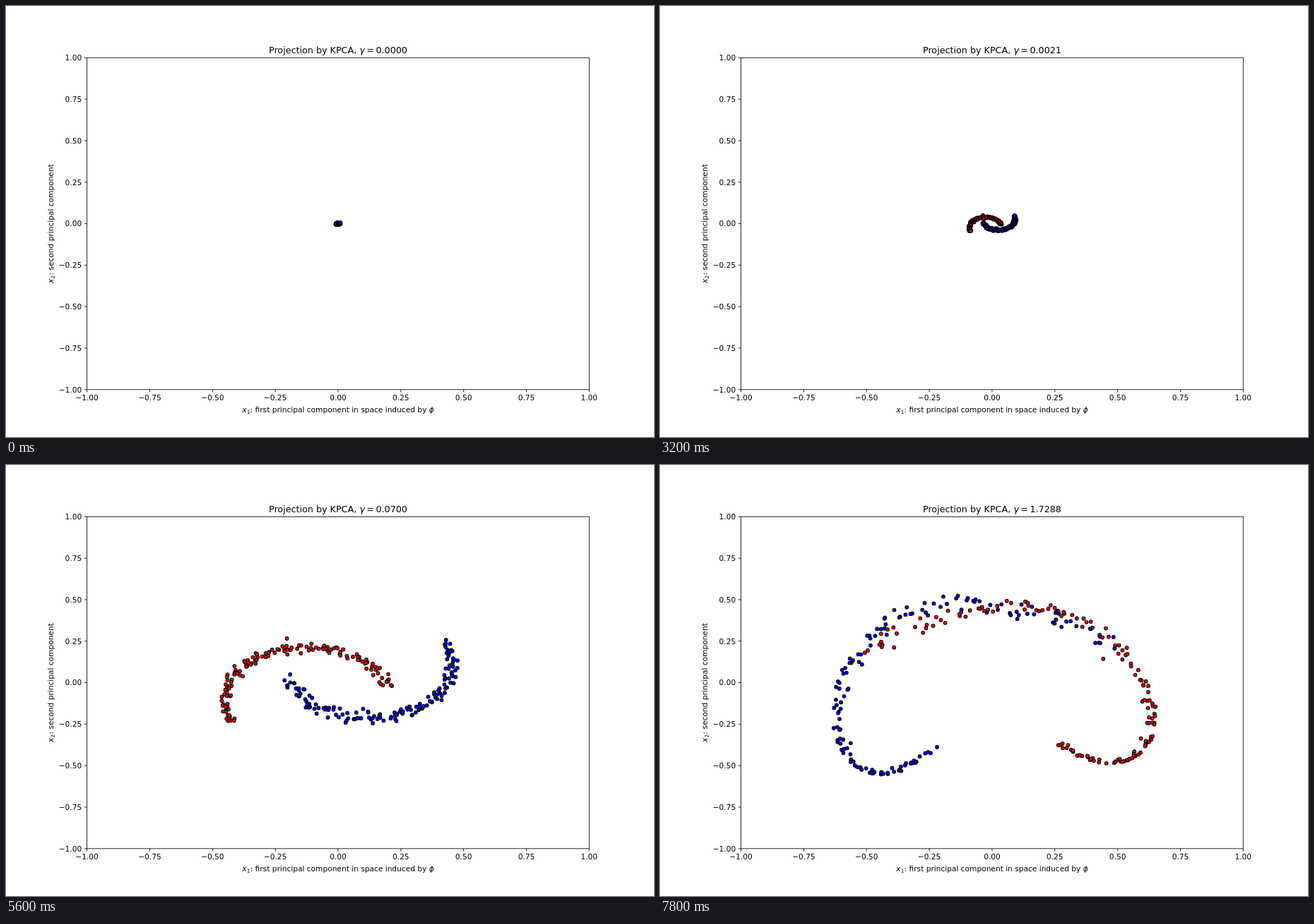
An HTML page with a canvas for the animation above (8 s loop, 917 px wide and 611 px high).

```html
<!DOCTYPE html>
<html lang="en">
<head>
<meta charset="utf-8">
<title>Kernel PCA projection</title>
<style>
html, body { margin: 0; width: 100%; height: 100%; overflow: hidden; background: #fff; }
canvas { display: block; }
</style>
</head>
<body>
<canvas id="stage" width="917" height="611"></canvas>
<script>
const ctx = document.getElementById('stage').getContext('2d');
const STEP_MS = 200, STEPS = 40, MIRROR_STEP = 34;
const PER_MOON = 150, NOISE = 0.05;
const PT = 917 / 12 / 72;
const LEFT = 114.6, RIGHT = 825.3, TOP = 73.3, BOTTOM = 543.8;
const toX = v => (LEFT + RIGHT) / 2 + v * (RIGHT - LEFT) / 2;
const toY = v => (TOP + BOTTOM) / 2 - v * (BOTTOM - TOP) / 2;

// ---- data: two noisy half moons ----
let seed = 123;
function random() {
  seed = (seed + 0x6D2B79F5) | 0;
  let r = Math.imul(seed ^ (seed >>> 15), 1 | seed);
  r = (r + Math.imul(r ^ (r >>> 7), 61 | r)) ^ r;
  return ((r ^ (r >>> 14)) >>> 0) / 4294967296;
}
const noise = () =>
  NOISE * Math.sqrt(-2 * Math.log(1 - random())) * Math.cos(2 * Math.PI * random());

// Coordinates are relative to the common centre (0.5, 0.25).
let points = [];
for (const side of [1, -1]) {
  for (let i = 0; i < PER_MOON; i++) {
    const t = Math.PI * i / (PER_MOON - 1);
    points.push({
      x: side * (Math.cos(t) - 0.5) + noise(),
      y: side * (Math.sin(t) - 0.25) + noise(),
      tip: Math.cos(t), side
    });
  }
}
const N = points.length;

// ---- kernel PCA with an RBF kernel ----
const dot = (a, b) => a.reduce((sum, v, i) => sum + v * b[i], 0);

function centre(v) {
  const mean = v.reduce((a, b) => a + b, 0) / N;
  return v.map(e => e - mean);
}

function kernel(gamma) {
  const K = new Float64Array(N * N);
  for (let i = 0; i < N; i++) {
    for (let j = 0; j < i; j++) {
      const dx = points[i].x - points[j].x, dy = points[i].y - points[j].y;
      // The missing constant 1 vanishes when centring.
      K[i * N + j] = K[j * N + i] = Math.expm1(-gamma * (dx * dx + dy * dy));
    }
  }
  return K;
}

function multiply(K, v) {
  const out = new Float64Array(N);
  for (let i = 0, k = 0; i < N; i++) {
    let sum = 0;
    for (let j = 0; j < N; j++) sum += K[k++] * v[j];
    out[i] = sum;
  }
  return centre(out);
}

function orthonormalise(vectors) {
  const basis = [];
  for (let v of vectors) {
    for (const b of basis.concat(basis)) {
      const d = dot(v, b);
      v = v.map((e, i) => e - d * b[i]);
    }
    const length = Math.sqrt(dot(v, v)) || 1;
    basis.push(v.map(e => e / length));
  }
  return basis;
}

// Jacobi rotations; returns eigenpairs, largest value first.
function eigen(A) {
  const n = A.length;
  const U = A.map((_, i) => A.map((_, j) => +(i === j)));
  for (let sweep = 0; sweep < 20; sweep++) {
    for (let p = 0; p < n; p++) for (let q = p + 1; q < n; q++) {
      const angle = Math.atan2(2 * A[p][q], A[q][q] - A[p][p]) / 2;
      const c = Math.cos(angle), s = Math.sin(angle);
      const rotate = row => {
        [row[p], row[q]] = [c * row[p] - s * row[q], s * row[p] + c * row[q]];
      };
      A.forEach(rotate);
      for (let k = 0; k < n; k++) {
        [A[p][k], A[q][k]] = [c * A[p][k] - s * A[q][k], s * A[p][k] + c * A[q][k]];
      }
      U.forEach(rotate);
    }
  }
  return A.map((row, i) => ({ value: row[i], vector: U.map(r => r[i]) }))
    .sort((a, b) => b.value - a.value);
}

const startFunctions = [
  p => p.x, p => p.y, p => p.x * p.x, p => p.x * p.y, p => p.y * p.y, p => p.x ** 3
];
const sideways = p => -p.side;
const across = p => p.y + p.x / 3;
const upward = p => across(p) + p.tip;

function project(step) {
  const gamma = 2e-5 * 10 ** (10 * step / 79);
  const K = kernel(gamma);
  let basis = orthonormalise(startFunctions.map(f => centre(Float64Array.from(points, f))));
  for (let i = 0; i < 14; i++) basis = orthonormalise(basis.map(v => multiply(K, v)));
  const images = basis.map(v => multiply(K, v));
  const pairs = eigen(basis.map(b => images.map(w => dot(b, w))));

  const component = ({ value, vector }, reference, sign) => {
    const v = basis[0].map((_, i) => vector.reduce((sum, c, k) => sum + c * basis[k][i], 0));
    const facing = dot(v, points.map(reference)) < 0 ? -1 : 1;
    return v.map(e => e * Math.sqrt(Math.max(value, 0)) * sign * facing);
  };
  return {
    gamma,
    xs: component(pairs[0], sideways, step < MIRROR_STEP ? 1 : -1),
    ys: component(pairs[1], upward, 1)
  };
}

// Of the two half-turn twins of the data, keep the one whose blue arc ends on top.
if (dot(project(STEPS - 1).ys, points.map(across)) > 0) {
  points = points.map(p => ({ x: -p.x, y: -p.y, tip: p.tip, side: -p.side })).reverse();
}

// ---- drawing ----
const font = (size, italic) =>
  `${italic ? 'italic ' : ''}${size * PT}px "DejaVu Sans", sans-serif`;

// Runs: { text, size, italic, drop, pad }, centred as one line on x.
function drawRuns(runs, x, y) {
  ctx.textAlign = 'left';
  const widths = runs.map(r => {
    ctx.font = font(r.size, r.italic);
    return ctx.measureText(r.text).width + 2 * (r.pad || 0);
  });
  x -= widths.reduce((a, b) => a + b) / 2;
  runs.forEach((r, i) => {
    ctx.font = font(r.size, r.italic);
    ctx.fillText(r.text, x + (r.pad || 0), y + (r.drop || 0));
    x += widths[i];
  });
}

const variable = index => [
  { text: 'x', size: 10, italic: true },
  { text: index, size: 7, drop: 1.7, pad: 0.2 }
];

function line(x1, y1, x2, y2) {
  ctx.beginPath();
  ctx.moveTo(x1, y1);
  ctx.lineTo(x2, y2);
  ctx.stroke();
}

function drawAxes() {
  ctx.strokeStyle = ctx.fillStyle = '#000';
  ctx.lineWidth = 0.8 * PT;
  ctx.strokeRect(LEFT, TOP, RIGHT - LEFT, BOTTOM - TOP);
  ctx.font = font(10);
  for (let v = -1; v <= 1; v += 0.25) {
    const label = v.toFixed(2).replace('-', '\u2212');
    line(toX(v), BOTTOM, toX(v), BOTTOM + 3.5 * PT);
    line(LEFT, toY(v), LEFT - 3.5 * PT, toY(v));
    ctx.textAlign = 'center';
    ctx.fillText(label, toX(v), 559.2);
    ctx.textAlign = 'right';
    ctx.fillText(label, 107.2, toY(v) + 3.9);
  }
  drawRuns([...variable('1'),
    { text: ': first principal component in space induced by ', size: 10 },
    { text: '\u03d5', size: 10, italic: true }], toX(0), 576);
  ctx.save();
  ctx.translate(67, toY(0));
  ctx.rotate(-Math.PI / 2);
  drawRuns([...variable('2'), { text: ': second principal component', size: 10 }], 0, 0);
  ctx.restore();
}

function draw({ gamma, xs, ys }) {
  ctx.fillStyle = '#fff';
  ctx.fillRect(0, 0, 917, 611);
  ctx.lineWidth = PT;
  ctx.strokeStyle = '#000';
  points.forEach((p, i) => {
    ctx.fillStyle = p.side > 0 ? '#f00' : '#00f';
    ctx.beginPath();
    ctx.arc(toX(xs[i]), toY(ys[i]), Math.sqrt(20) / 2 * PT, 0, 2 * Math.PI);
    ctx.fill();
    ctx.stroke();
  });
  drawAxes();
  drawRuns([
    { text: 'Projection by KPCA, ', size: 12 },
    { text: '\u03b3', size: 12, italic: true },
    { text: '=', size: 12, pad: 2.5 },
    { text: gamma.toFixed(4), size: 12 }
  ], toX(0), 66.6);
}

const cache = [];
let shown = -1;
function tick() {
  const step = Math.floor(performance.now() / STEP_MS) % STEPS;
  if (step !== shown) {
    draw(cache[step] ||= project(step));
    shown = step;
  }
  requestAnimationFrame(tick);
}
tick();
</script>
</body>
</html>
```
